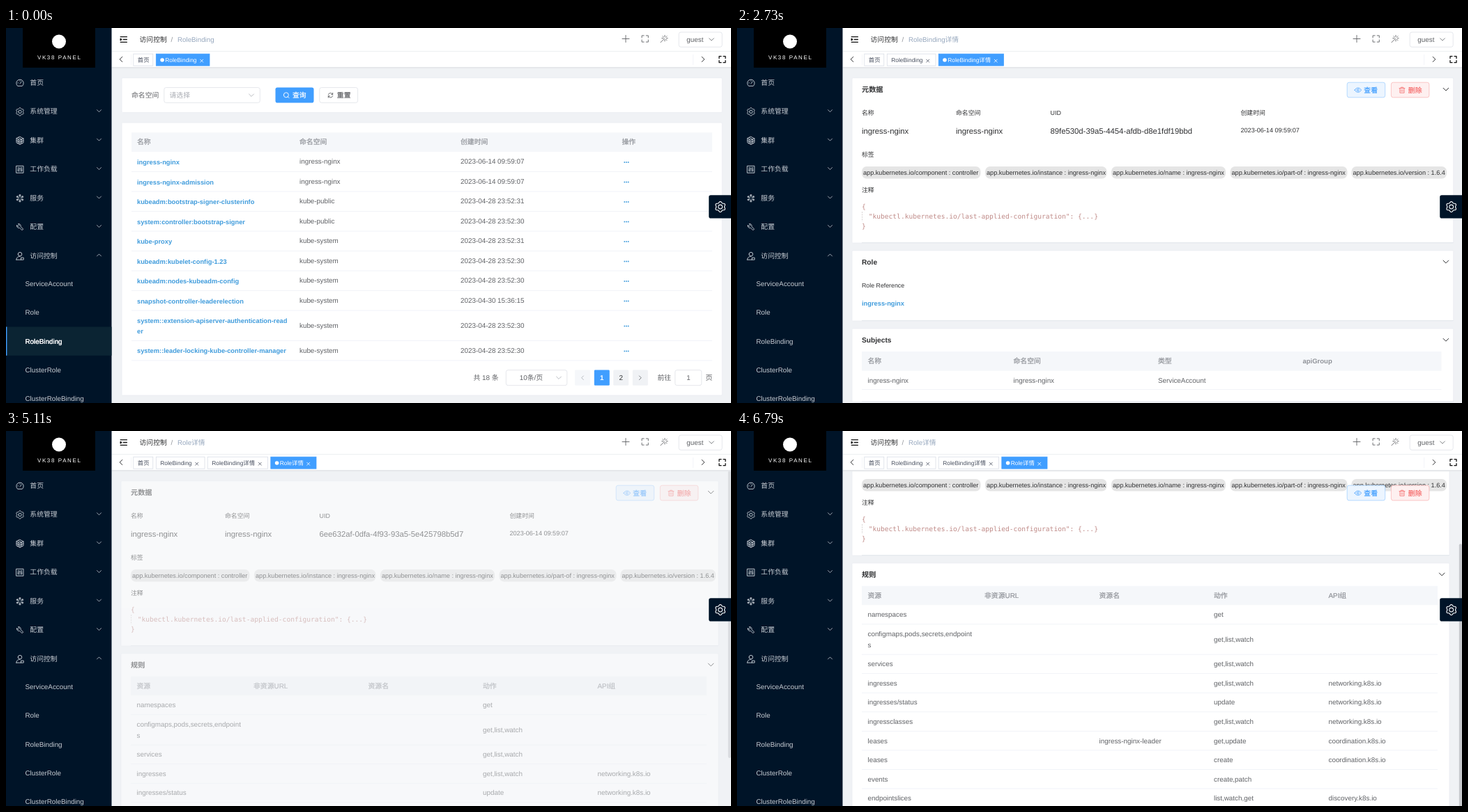
These frames come from a looping animation (1040 by 539 pixels, 7560 ms). An HTML page:

```html
<!DOCTYPE html>
<html lang="zh-CN">
<head>
<meta charset="utf-8">
<title>RoleBinding</title>
<style>
  html, body { margin: 0; width: 100%; height: 100%; overflow: hidden; background: #f0f2f5; }
  svg { display: block; width: 1040px; height: 539px; }
  text { font-family: "Liberation Sans", "Noto Sans CJK SC", "Noto Sans CJK", sans-serif; white-space: pre; text-rendering: geometricPrecision; }
  .mono { font-family: "DejaVu Sans Mono", monospace; }
</style>
</head>
<body>
<svg id="stage" viewBox="0 0 1040 539"></svg>
<script>
const LOOP = 7560, TICK = 70;
const BLUE = '#409eff', RED = '#f56c6c', NAVY = '#001428', INK = '#303133', BODY = '#606266', GRAY = '#909399', LINE = '#ebeef5', EDGE = '#dcdfe6';
const LINK = '#409cdc', LINK_HOVER = '#82bfe8';

// Drawing helpers; text is placed by its vertical middle.
const text = (x, y, s, o = {}) => {
  const { size = 9.85, fill = BODY, medium, bold, attrs = '' } = o;
  const weight = bold ? 'font-weight="700"' : medium ? `stroke="${fill}" stroke-width=".22"` : '';
  return `<text x="${x}" y="${y + size * .35}" font-size="${size}" fill="${fill}" ${weight} ${attrs}>${s}</text>`;
};
const link = (x, y, s, fill = LINK) => text(x, y, s, { size: 9.3, fill, bold: true });
const rect = (x, y, w, h, fill, o = {}) =>
  `<rect x="${x}" y="${y}" width="${w}" height="${h}" fill="${fill}" rx="${o.r || 0}" stroke="${o.stroke || 'none'}" stroke-width=".75" ${o.attrs || ''}/>`;
const icon = (x, y, d, color = INK, width = .9) =>
  `<path transform="translate(${x} ${y})" d="${d}" fill="none" stroke="${color}" stroke-width="${width}" stroke-linecap="round" stroke-linejoin="round"/>`;
const ring = r => `M${-r} 0a${r} ${r} 0 1 0 ${2 * r} 0a${r} ${r} 0 1 0 ${-2 * r} 0`;
const chevron = (x, y, dir = 'down', color = GRAY, s = 3.4, width = .8) => icon(x, y, {
  down: `M${-s} ${-s / 2}L0 ${s / 2}L${s} ${-s / 2}`,
  up: `M${-s} ${s / 2}L0 ${-s / 2}L${s} ${s / 2}`,
  left: `M${s / 2} ${-s}L${-s / 2} 0L${s / 2} ${s}`,
  right: `M${-s / 2} ${-s}L${s / 2} 0L${-s / 2} ${s}`
}[dir], color, width);
const gear = r => 'M' + Array.from({ length: 48 }, (_, i) => {
  const a = i * Math.PI / 24, d = r * (.88 + .12 * Math.cos(6 * a));
  return `${(d * Math.sin(a)).toFixed(2)} ${(d * Math.cos(a)).toFixed(2)}`;
}).join('L') + 'Z' + ring(r * .38);
const corners = s => `M${-s} ${-s / 3}V${-s}H${-s / 3}M${s / 3} ${-s}H${s}V${-s / 3}M${s} ${s / 3}V${s}H${s / 3}M${-s / 3} ${s}H${-s}V${s / 3}`;
const group = (id, content) => `<g id="${id}">${content}</g>`;
const card = (y, bottom, x, right) =>
  rect(x, y, right - x, bottom - y, '#fff', { r: 1.5, stroke: '#e8ebf1' });
const rule = (x, y, right, color = LINE) => rect(x, y - .35, right - x, .7, color);

function sidebar() {
  const pale = '#c6cbd2';
  const rays = [0, 1, 2, 3, 4, 5].map(i => {
    const a = i * Math.PI / 3, x = 4.2 * Math.sin(a), y = 4.2 * Math.cos(a);
    return `M${x * .4} ${y * .4}L${x} ${y}m-1.1 0a1.1 1.1 0 1 0 2.2 0a1.1 1.1 0 1 0-2.2 0`;
  }).join('');
  const items = [
    ['首页', 'M-3.6 4.2A5.2 5.2 0 1 1 3.6 4.2ZM0 1L2.4-2M-3 0h.4M0-3v.4'],
    ['系统管理', gear(5.8)],
    ['集群', 'M0-5.5L5-3V3L0 5.5L-5 3V-3ZM-5-3L0-.5L5-3M0-.5V5.5M-2.5-4.2L2.5-1.7V4M-2.5-1.7V4M-5 0L0 2.5L5 0'],
    ['工作负载', 'M-5-5H5V5H-5ZM-2.5-3V3M0-3V3M2.5-3V3M-3.2 1h1.4M-.7-1h1.4M1.8 1h1.4'],
    ['服务', rays],
    ['配置', 'M-4.5-2.5A3 3 0 0 0-.5 1L3 4.5L4.7 2.8L1-.7A3 3 0 0 0-2.5-4.6L-1-2.5L-2.5-1Z'],
    ['访问控制', 'M-2.8-2.5a2.8 2.8 0 1 0 5.6 0a2.8 2.8 0 1 0-5.6 0M-5.2 5.5C-5 1.5-2 .8 0 .8M-5.2 5.5H5.2V2.5H1.5V5.5']
  ];
  const subs = ['ServiceAccount', 'Role', 'RoleBinding', 'ClusterRole', 'ClusterRoleBinding'];
  return rect(0, 0, 151.5, 539, NAVY)
    + rect(24, 0, 104, 57, '#000')
    + '<circle cx="76" cy="19.5" r="10" fill="#fff"/>'
    + text(45, 42.5, 'VK38 PANEL', { size: 8, fill: '#fff', attrs: 'letter-spacing="1.6"' })
    + group('activeItem', rect(0, 429.5, 151.5, 41.3, '#0b2433') + rect(0, 429.5, 1.4, 41.3, BLUE))
    + items.map(([label, d], i) => {
      const y = 78.5 + 41.45 * i;
      return icon(20, y + .4, d, pale, .95) + text(34.3, y, label, { fill: pale })
        + (i ? chevron(133.5, y - .8, i === 6 ? 'up' : 'down', pale, 3) : '');
    }).join('')
    + subs.map((s, i) => text(27.5, 367.5 + 41.35 * i, s, { fill: pale })).join('')
    + group('activeLabel', text(27.5, 450.2, 'RoleBinding', { fill: '#fff', medium: true }));
}

function header() {
  const wand = 'M.5-.5L-5 5' + [0, 1, 2, 3, 4, 5, 6].map(i => {
    const a = (i * 45 - 90) * Math.PI / 180, x = Math.sin(a), y = -Math.cos(a);
    return `M${1 + x * 2.2} ${-1 + y * 2.2}L${1 + x * 4.2} ${-1 + y * 4.2}`;
  }).join('');
  return rect(151.5, 0, 889, 57, '#fff')
    + rule(151.5, 33.5, 1040, '#e6e8ec') + rect(151.5, 56.4, 889, .8, '#d5d8dd') + rect(151.5, 57.2, 889, 1, '#e6e8eb')
    + icon(168.8, 16.5, 'M-4.6-3.8H4.6M-.5 0H4.6M-4.6 3.8H4.6M-4.6-1.2L-3 0L-4.6 1.2Z', '#111', 1.3)
    + text(191.5, 16.5, '访问控制', { fill: INK }) + text(236.5, 16.5, '/', { fill: GRAY })
    + icon(889, 15.5, 'M-5 0H5M0-5V5', BODY) + icon(916.7, 15.5, corners(4.6), BODY) + icon(944, 15.7, wand, BODY)
    + rect(965.2, 6, 62, 21.3, '#fff', { r: 2.8, stroke: EDGE })
    + text(976.3, 16.7, 'guest') + chevron(1012, 16.5, 'down', BODY, 3.3)
    + chevron(165, 45, 'left', INK, 3.6, 1) + chevron(1000, 45, 'right', INK, 3.6, 1)
    + rect(179.5, 38, .6, 15, LINE) + rect(985.5, 38, .6, 15, LINE)
    + icon(1027.5, 45.2, corners(4.5), '#111', 1.3)
    + rect(182.8, 37.2, 28, 17, '#fff', { stroke: '#d8dce5' }) + text(188.8, 46, '首页', { size: 8.4, fill: '#495060' });
}

function tab(x, right, label, active) {
  const color = active ? '#fff' : '#495060', close = right - 11.3;
  return rect(x, 37.2, right - x, 17, active ? BLUE : '#fff', { stroke: active ? BLUE : '#d8dce5' })
    + (active ? `<circle cx="${x + 8.8}" cy="46" r="2.8" fill="#fff"/>` : '')
    + text(x + (active ? 13 : 6), 46, label, { size: 8.4, fill: color })
    + icon(close, 47.2, 'M-2-2L2 2M2-2L-2 2', color, .8);
}
const crumb = label => text(246, 16.5, label, { fill: '#97a8be', size: 9.75 });

function listPage() {
  const rows = [
    ['ingress-nginx', 'ingress-nginx', '2023-06-14 09:59:07'],
    ['ingress-nginx-admission', 'ingress-nginx', '2023-06-14 09:59:07'],
    ['kubeadm:bootstrap-signer-clusterinfo', 'kube-public', '2023-04-28 23:52:31'],
    ['system:controller:bootstrap-signer', 'kube-public', '2023-04-28 23:52:30'],
    ['kube-proxy', 'kube-system', '2023-04-28 23:52:31'],
    ['kubeadm:kubelet-config-1.23', 'kube-system', '2023-04-28 23:52:30'],
    ['kubeadm:nodes-kubeadm-config', 'kube-system', '2023-04-28 23:52:30'],
    ['snapshot-controller-leaderelection', 'kube-system', '2023-04-30 15:36:15'],
    ['system::extension-apiserver-authentication-read|er', 'kube-system', '2023-04-28 23:52:30'],
    ['system::leader-locking-kube-controller-manager', 'kube-system', '2023-04-28 23:52:30']
  ];
  let top = 178, table = '';
  for (const [name, space, time] of rows) {
    const lines = name.split('|'), height = lines.length > 1 ? 43.4 : 28.5, y = top + height / 2;
    lines.forEach((s, i) => table += link(188, y + .5 + (i - (lines.length - 1) / 2) * 15.8, s));
    table += text(421, y - .2, space) + text(652, y - .2, time)
      + [887.3, 890, 892.7].map(x => `<circle cx="${x}" cy="${y + .8}" r=".95" fill="${LINK}"/>`).join('')
      + rule(180, top + height, 1013);
    top += height;
  }
  const pageButton = (x, fill) => rect(x, 491.6, 22, 22.2, fill, { r: 1.4 });
  return card(71.7, 121.5, 166, 1027.3) + text(180, 97, '命名空间')
    + rect(226.8, 85.6, 137.5, 21.8, '#fff', { r: 2.8, stroke: EDGE }) + text(234.5, 97, '请选择', { fill: '#a8abb2' })
    + chevron(352, 96.7, 'down', '#a8abb2')
    + rect(386.5, 85.4, 55, 22.2, BLUE, { r: 2.8 }) + icon(401.8, 96.3, ring(3.5) + 'M2.5 2.5L4.2 4.2', '#fff')
    + text(411, 97, '查询', { fill: '#fff', medium: true })
    + rect(449.8, 85.6, 54.8, 21.8, '#fff', { r: 2.8, stroke: EDGE })
    + icon(465.5, 96.7, 'M-3.2-1A3.4 3.4 0 0 1 3.2-1M3.2-3.4V-1H1.2M3.2 1A3.4 3.4 0 0 1-3.2 1M-3.2 3.4V1H-1.2', BODY)
    + text(474.8, 97, '重置', { medium: true })
    + card(136, 528, 166, 1027.3) + rect(180, 150.3, 833, 27.7, '#f5f7fa')
    + [[188, '名称'], [421, '命名空间'], [652, '创建时间'], [883.5, '操作']].map(([x, s]) => text(x, 163.7, s, { fill: GRAY, medium: true })).join('')
    + table
    + text(670.5, 503, '共 18 条') + rect(717.3, 491.7, 87.5, 22, '#fff', { r: 2.8, stroke: EDGE })
    + text(736.7, 503, '10条/页') + chevron(793, 502.8, 'down', '#a8abb2')
    + pageButton(816, '#f5f7fa') + chevron(827, 502.8, 'left', '#a8abb2', 2.8)
    + pageButton(843.8, BLUE) + text(854.8, 503, '1', { fill: '#fff', bold: true, attrs: 'text-anchor="middle"' })
    + pageButton(871.2, '#f0f2f5') + text(882.2, 503, '2', { fill: INK, attrs: 'text-anchor="middle"' })
    + pageButton(898.8, '#f0f2f5') + chevron(909.8, 502.8, 'right', BODY, 2.8)
    + text(934.5, 503, '前往') + rect(959.8, 491.7, 38, 22, '#fff', { r: 2.8, stroke: EDGE })
    + text(979, 503, '1', { attrs: 'text-anchor="middle"' }) + text(1003.5, 503, '页');
}

const heading = (y, s, right) => text(179, y, s, { size: 10.2, fill: INK, bold: true }) + chevron(right - 10.8, y, 'down', INK, 3.8, 1);
const panel = (y, bottom, right) => card(y, bottom, 165, right) + rule(179, bottom - .6, right, '#dfe2e8');

function metadata(uid, right, hover = '') {
  const label = (x, y, s) => text(x, y, s, { size: 8.9, fill: INK });
  const value = (x, s) => text(x, 148.2, s, { size: 11.3, fill: INK });
  const code = (x, y, s) => text(x, y, s, { size: 9.6, fill: '#c08b88', attrs: 'class="mono"' });
  const tags = [
    [179, 349.5, 'component : controller'], [356, 530.5, 'instance : ingress-nginx'], [537, 701, 'name : ingress-nginx'],
    [707.5, 875.5, 'part-of : ingress-nginx'], [881.5, 1018, 'version : 1.6.4']
  ];
  return panel(71.7, 309, right) + heading(88.2, '元数据', right)
    + label(179, 121.7, '名称') + label(314, 121.7, '命名空间') + label(449.5, 121.7, 'UID') + label(722.5, 121.7, '创建时间')
    + value(179, 'ingress-nginx') + value(314, 'ingress-nginx') + value(449.5, uid)
    + text(722.5, 146.5, '2023-06-14 09:59:07', { size: 9.08, fill: INK })
    + label(179, 182, '标签') + label(179, 233, '注释')
    + tags.map(([x, end, s]) => rect(x, 199, end - x, 17.5, '#e5e5e5', { r: 7 })
      + text(x + 2, 207.7, 'app.kubernetes.io/' + s, { size: 9.15, fill: INK })).join('')
    + hover + code(179, 257, '{') + code(188.7, 271, '"kubectl.kubernetes.io/last-applied-configuration": {...}') + code(179, 285, '}')
    + `<path d="M179.6 264V278" stroke="#c8c0c0" stroke-width=".7" stroke-dasharray="2 1.4"/>`;
}

const actions = () =>
  rect(875.2, 78.2, 54.5, 21.6, '#ecf5ff', { r: 2.8, stroke: '#a0cfff' })
  + icon(890.8, 89.2, 'M-4.6 0C-2.5-4.2 2.5-4.2 4.6 0C2.5 4.2-2.5 4.2-4.6 0Z' + ring(1.5), BLUE, .8)
  + text(899.3, 89.2, '查看', { fill: BLUE, medium: true })
  + rect(938.4, 78.2, 54.5, 21.6, '#fef0f0', { r: 2.8, stroke: '#fab6b6' })
  + icon(954, 89.2, 'M-4-2.6H4M-1.6-2.6V-4H1.6V-2.6M-3.1-2.6V4H3.1V-2.6M-1.1-.6V2.2M1.1-.6V2.2', RED, .8)
  + text(962.8, 89.2, '删除', { fill: RED, medium: true });

function bindingPage() {
  const columns = [187.5, 396.5, 604, 811.5], right = 1027.7;
  return metadata('89fe530d-39a5-4454-afdb-d8e1fdf19bbd', right, rect(180, 250, 847.7, 14, '#e6f7ff', { attrs: 'id="hoverLine"' }))
    + panel(319.8, 421, right) + heading(336, 'Role', right)
    + text(179, 369.7, 'Role Reference', { size: 8.8, fill: INK })
    + group('roleLink', link(179, 395.3, 'ingress-nginx'))
    + group('roleLinkHover', link(179, 395.3, 'ingress-nginx', LINK_HOVER))
    + panel(432, 537.5, right) + heading(448.3, 'Subjects', right)
    + rect(179, 465, 831.5, 27.7, '#f5f7fa')
    + ['名称', '命名空间', '类型'].map((s, i) => text(columns[i], 478.7, s, { fill: GRAY, medium: true })).join('')
    + text(columns[3], 478.7, 'apiGroup', { size: 9.5, fill: GRAY, bold: true })
    + ['ingress-nginx', 'ingress-nginx', 'ServiceAccount'].map((s, i) => text(columns[i], 506.2, s)).join('')
    + rule(179, 519.7, 1010.5);
}

function rolePage() {
  const columns = [187.5, 355, 519.5, 684, 848.5], right = 1022;
  const rows = [
    ['namespaces', '', 'get', ''], ['configmaps,pods,secrets,endpoint|s', '', 'get,list,watch', ''],
    ['services', '', 'get,list,watch', ''], ['ingresses', '', 'get,list,watch', 'networking.k8s.io'],
    ['ingresses/status', '', 'update', 'networking.k8s.io'], ['ingressclasses', '', 'get,list,watch', 'networking.k8s.io'],
    ['leases', 'ingress-nginx-leader', 'get,update', 'coordination.k8s.io'], ['leases', '', 'create', 'coordination.k8s.io'],
    ['events', '', 'create,patch', ''], ['endpointslices', '', 'list,watch,get', 'discovery.k8s.io']
  ];
  let top = 380.2, table = '';
  for (const [resource, name, verbs, api] of rows) {
    const lines = resource.split('|'), height = lines.length > 1 ? 43.4 : 27.55, y = top + height / 2;
    lines.forEach((s, i) => table += text(columns[0], y + (i - (lines.length - 1) / 2) * 15.8, s));
    table += text(columns[2], y, name) + text(columns[3], y, verbs) + text(columns[4], y, api) + rule(179, top + height, 1005);
    top += height;
  }
  return metadata('6ee632af-0dfa-4f93-93a5-5e425798b5d7', right)
    + panel(319.8, 690, right) + heading(336, '规则', right)
    + rect(179, 352.7, 826, 27.5, '#f5f7fa')
    + ['资源', '非资源URL', '资源名', '动作', 'API组'].map((s, i) => text(columns[i], 366.3, s, { fill: GRAY, medium: true })).join('')
    + table;
}

document.getElementById('stage').innerHTML =
  '<clipPath id="mainArea"><rect x="151.5" y="57" width="888.5" height="482"/></clipPath>'
  + rect(0, 0, 1040, 539, '#f0f2f5')
  + '<g clip-path="url(#mainArea)">'
  + group('list', listPage())
  + group('binding', group('bindingScroll', bindingPage()) + actions())
  + group('role', group('roleScroll', rolePage()) + actions() + rect(1035.8, 57, 4.2, 413, '#c6c8cc', { r: 2, attrs: 'id="thumb"' }))
  + '</g>' + header()
  + group('nav0', crumb('RoleBinding') + tab(215.3, 292, 'RoleBinding', true))
  + group('nav1', crumb('RoleBinding详情') + tab(215.3, 285, 'RoleBinding') + tab(289.2, 382.5, 'RoleBinding详情', true))
  + group('nav2', crumb('Role详情') + tab(215.3, 285, 'RoleBinding') + tab(289.2, 375.6, 'RoleBinding详情') + tab(379.8, 445, 'Role详情', true))
  + sidebar()
  + `<path d="M1040 240.3H1011a2.8 2.8 0 0 0-2.8 2.8V270.7a2.8 2.8 0 0 0 2.8 2.8H1040Z" fill="${NAVY}"/>`
  + icon(1024.7, 257, gear(7.6), '#fff', 1.1)
  + rect(0, 0, 0, 1.4, BLUE, { attrs: 'id="progress"' });

// Linear interpolation through [time, value] pairs.
function track(t, points) {
  if (t <= points[0][0]) return points[0][1];
  for (let i = 1; i < points.length; i++) {
    const [t0, v0] = points[i - 1], [t1, v1] = points[i];
    if (t <= t1) return v0 + (v1 - v0) * (t - t0) / (t1 - t0);
  }
  return points[points.length - 1][1];
}
const set = (id, name, value) => document.getElementById(id).setAttribute(name, value);
const show = (id, visible) => set(id, 'display', visible ? 'inline' : 'none');
const fade = (id, opacity) => { set(id, 'opacity', opacity); show(id, opacity > 0); };
const scroll = (id, y) => set(id, 'transform', `translate(0 ${-y})`);

function render(now) {
  const t = Math.floor(now % LOOP / TICK) * TICK;
  const route = t < 1050 ? 0 : t < 4620 ? 1 : 2;
  [0, 1, 2].forEach(i => show('nav' + i, i === route));
  show('activeItem', route === 0);
  show('activeLabel', route === 0);

  fade('list', track(t, [[1050, 1], [1260, 0]]));
  fade('binding', track(t, [[1400, 0], [1680, 1], [4620, 1], [4830, 0]]));
  fade('role', track(t, [[4970, 0], [5250, 1]]));

  const elapsed = t - [LOOP, 1050, 4620][route];
  set('progress', 'width', track(elapsed, [[0, 103], [140, 900], [210, 1000]]));
  fade('progress', elapsed < 0 ? 0 : track(elapsed, [[70, 1], [210, 0]]));

  scroll('bindingScroll', track(t, [[2100, 0], [2380, 3], [2450, 3], [2730, 0]]));
  show('hoverLine', t >= 2870 && t < 3080);
  set('hoverLine', 'y', t < 2940 ? 250 : 264);
  show('roleLink', t < 3500);
  show('roleLinkHover', t >= 3500);

  const roleY = track(t, [[5530, 0], [5600, 9], [5670, 31], [5740, 67], [5810, 100], [5880, 122], [5950, 130],
    [6300, 130], [6510, 128], [6580, 128], [6790, 130]]);
  scroll('roleScroll', roleY);
  set('thumb', 'y', 57 + roleY * .81);
  requestAnimationFrame(render);
}
render(0);
</script>
</body>
</html>
```
